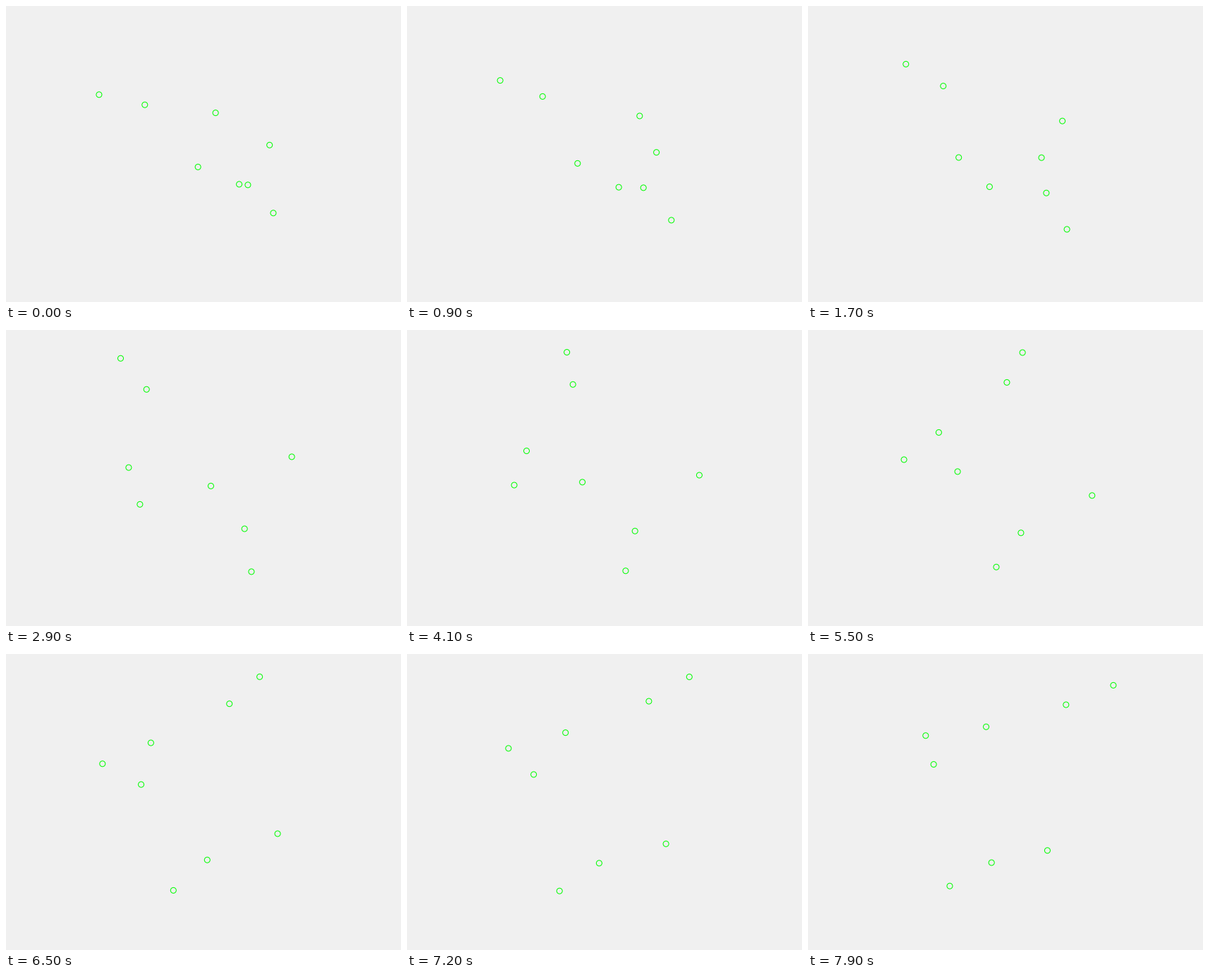
These frames come from a looping animation (560 px wide and 420 px high, 8 s). A matplotlib script:

```python
import numpy as np
import matplotlib.pyplot as plt
from matplotlib.animation import FuncAnimation
from matplotlib.patches import Circle

W, H, DPI = 560, 420, 100
FRAMES, INTERVAL = 80, 100
CENTER = (289.5, 202.3)        # middle of the plot area, in pixels
FIT_HEIGHT = 0.815 * H         # the bounding box always fills this height
START, STEP = -62.1, 1.99      # azimuth in degrees, degrees per frame
ELEV = np.radians(30)

# Eight corners of one rigid cloud; all motion comes from turning it
X = np.array([-110, -80, -112, -103, -7, 44, 113, 49])
Y = np.array([122, 63, -44, -122, -103, -23, 56, -77])
Z = np.array([110, 95, 38, 26, 39, -75, -13, -110])


def tilt(depth, height):
    return depth * np.sin(ELEV) + height * np.cos(ELEV)


def project(azim):
    """Orthographic view of the turning cloud, scaled to fit the height."""
    c, s = np.cos(azim), np.sin(azim)
    box_depth = np.ptp(X) * abs(s) + np.ptp(Y) * abs(c)
    scale = FIT_HEIGHT / tilt(box_depth, np.ptp(Z))
    across = X * c + Y * s
    up = tilt(Y * c - X * s, Z)
    return CENTER[0] + scale * across, CENTER[1] - scale * up


fig = plt.figure(figsize=(W / DPI, H / DPI), dpi=DPI, facecolor="#f0f0f0")
ax = fig.add_axes([0, 0, 1, 1])
ax.set_xlim(0, W)
ax.set_ylim(H, 0)
ax.axis("off")

rings = [
    ax.add_patch(Circle((0, 0), 4, fill=False, ec="#00ff00", lw=0.72))
    for _ in X
]


def draw(i):
    # the first pose is held for two frames
    azim = np.radians(START + STEP * max(i, 1))
    for ring, x, y in zip(rings, *project(azim)):
        ring.center = (x, y)
    return rings


anim = FuncAnimation(fig, draw, frames=FRAMES, init_func=lambda: draw(0),
                     interval=INTERVAL, repeat=True, repeat_delay=0)
plt.show()
```
